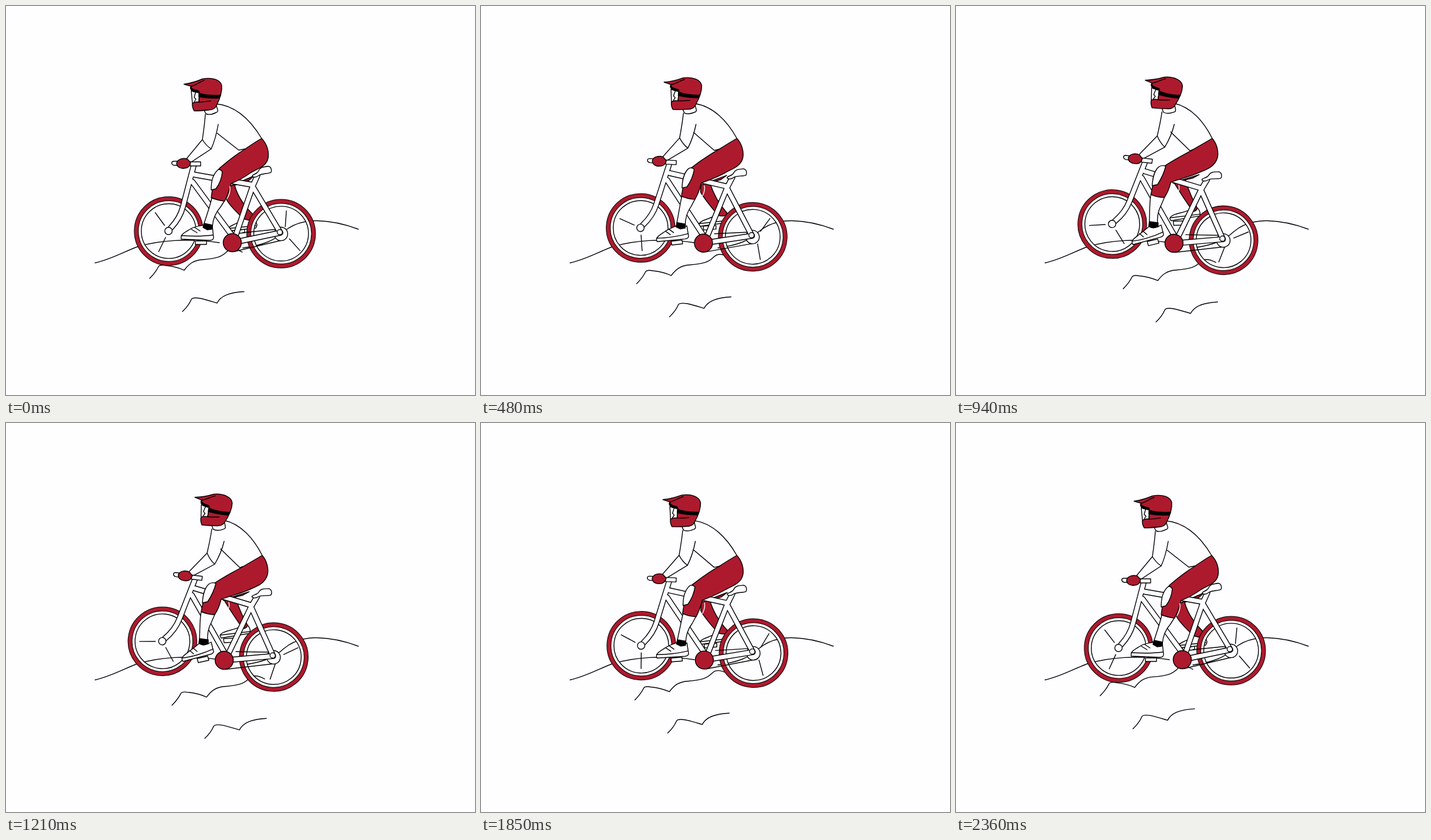
Recreate the animation shown at these times as an HTML page. Size 800 by 664 pixels, loop 2.39 s.

```html
<!DOCTYPE html>
<html lang="en">
<head>
<meta charset="utf-8">
<title>Cyclist</title>
<style>
  html, body { margin: 0; height: 100%; overflow: hidden; background: #fefdff; }
  svg { display: block; width: 800px; height: 664px; }
  .line { fill: none; }
  .white { fill: #fefdff; }
  .red { fill: #ad1a2d; }
  .black { fill: #000; }
</style>
</head>
<body>
<svg viewBox="0 0 800 664" stroke="#000" stroke-width="1.4" stroke-linecap="round" stroke-linejoin="round">
  <defs>
    <g id="wheel" class="line">
      <circle r="50" stroke="#fefdff" stroke-width="6"/>
      <circle r="55.2" stroke-width="8"/>
      <circle r="55.2" stroke="#ad1a2d" stroke-width="6"/>
      <circle r="46.7"/>
    </g>
    <path id="spoke" d="M12 0H39"/>
    <path id="tubes" class="line" d="M281 379Q297 362 302 342L320 273M322 288L419 305M318 300L385 391
      M429 289L421 307L391 394M422 310L468 387L396 402"/>
  </defs>

  <path class="line" d="M152 438.5C179 432.5 200 420 224 411C260 400 310 396 364 404
    M404 413C440 408 458 400 474 385C492 370 512 366.5 530 366.5C555 367 580 373 601 381"/>
  <path id="ground" class="line" d="M245 465C252 458 257 451 260 445C262 441 268 442 273 443C285 444 295 447 304 451
    C312 440 320 434 335 433C360 431 368 428 377 419C383 413 392 414 403 420
    M301 521.5C308 515 313 508 316 501C318 497 325 498 331 499C341 501 350 504 360 507C366 495 380 489 406 487.5"/>

  <!-- far leg -->
  <path class="white" d="M386 383L407 381L407 387L387 389Z"
    data-to="M371 368L394 367L394 374L372 375Z"/>
  <path class="white" d="M377 382C380 374 396 372 406 363L424 366C428 370 429 375 426 379L380 384Z"
    data-to="M365 363C368 355 384 355 400 348L413 346C416 350 418 354 416 359L367 367Z"/>
  <path class="line" d="M377 380L426 375" data-to="M366 362L416 356"/>
  <path class="red" d="M379 309L423 290L413 299L390 306C396 328 410 346 427 361C425 367 416 367 405 363C394 352 382 342 376 330Z"
    data-to="M370 302L415 288L404 294L391 297C397 315 404 332 412 345C411 350 408 351 404 351C394 337 382 319 373 304Z"/>

  <g class="bike">
    <use href="#wheel" x="277.5" y="384.2"/>
    <use href="#wheel" x="469.3" y="388.6"/>
    <g transform="translate(277.5 384.2)"><g id="front">
      <use href="#spoke" transform="rotate(116)"/><use href="#spoke" transform="rotate(234)"/>
    </g></g>
    <g transform="translate(475.5 388.6)"><g id="rear">
      <use href="#spoke" transform="rotate(48)"/><use href="#spoke" transform="rotate(-86)"/>
    </g></g>
    <path class="line" d="M404 387L463 381M390 419L470 400"/>
    <circle class="white" cx="469" cy="389" r="11.5"/>
    <use href="#tubes" stroke-width="10"/>
    <use href="#tubes" stroke="#fefdff" stroke-width="7.2"/>
    <circle class="line" cx="467" cy="386" r="4.5"/>
    <circle class="white" cx="277.2" cy="384" r="6.3"/>
    <circle class="red" cx="386" cy="404" r="15.5"/>
    <path class="white" d="M420 290C422 286 428 288 431 281C434 274 441 275 447 273.5C452 274 454 280 452 284C447 287 436 285 430 290C426 293 421 293 420 290Z"/>
  </g>

  <!-- near leg -->
  <path class="white" d="M323 401L342 401L342 407L323 407Z" data-to="M326 402L344 398L346 405L328 409Z"/>
  <path class="white" d="M351 328C347 345 342 358 337 374L352 377C353 362 358 352 366 343L373 332Z"
    data-to="M333 322C330 338 331 354 330 371L344 374C343 360 345 350 350 341L356 327Z"/>
  <path class="white" d="M299 398C297 390 304 387 314 381C321 376 329 376 337 374C340 381 347 381 352 376L354 395C354 398 352 400 348 400Z"
    data-to="M302 407C297 401 303 397 311 391C319 385 324 381 330 376C333 380 341 379 350 374L354 390C354 392 352 394 348 395Z"/>
  <path class="line" d="M299 392C315 393 338 393 353 391M316 381L326 387M322 378L331 384"
    data-to="M300 401C315 400 338 393 353 386M313 388L320 394M319 384L326 390"/>
  <path class="black" d="M338 371L352 374L351 381L343 382L336 378Z"
    data-to="M330 368L345 370L345 377L337 379L329 376Z"/>
  <path class="red" d="M436 226C446 236 449 250 447 260C444 274 430 277 417 285C404 294 394 299 384 303C381 314 378 323 373 333Q361 332 350 327C353 305 356 289 364 277C378 265 393 253 408 244C418 237 427 231 436 226Z"
    data-to="M437 226C446 236 448 250 446 259C442 273 430 278 418 283C402 291 382 295 367 301C364 313 361 320 356 327Q344 327 333 322C337 300 340 285 352 276C366 266 384 256 401 247C413 240 425 233 437 226Z"/>
  <path class="white" d="M361 280C364 278 367 280 369 283C368 295 364 304 358 312L350 314C350 300 352 289 361 280Z"
    data-to="M346 275C350 272 354 272 358 274C355 286 350 296 344 305L335 307C336 294 338 282 346 275Z"/>
  <path class="line" stroke="#fefdff" d="M382 308C383 317 380 324 377 329" data-to="M380 306C382 311 380 315 379 318"/>

  <!-- torso and arm -->
  <path class="line" d="M358 167C392 170 418 196 436 226M360 217L397 246L408 244"
    data-to="M371 166C401 172 423 198 437 226M366 215L399 247L404 245"/>
  <path class="line" d="M340 185C339 200 337 214 335 228L306 263M362 202C359 219 355 233 350 244L315 267M335 228Q341 238 350 244"
    data-to="M351 181C349 196 346 209 343 222L313 253M372 202C369 215 363 229 356 241L317 262M343 222Q348 234 356 241"/>

  <g class="bike">
    <path class="white" d="M314 266H332V273H314ZM296 265H286C281 266 282 271 287 272L298 272Z"/>
    <path class="red" d="M291 268C293 261 302 259 309 261L315 267C314 273 310 277 304 277C298 278 291 275 291 268Z"/>
    <path class="white" d="M338 178L341 184Q348 187 358 182Q362 181 361 177L358 168Z"/>
    <path class="white" d="M316 145L330 146L329 165L318 166Z"/>
    <path class="line" d="M324 145L321 156L324 159L321 164"/>
    <path class="red" d="M303.5 133.5Q320 131 335 124.5C352 121 366 126 368 136C369 148 364 160 359 170Q356 177 346 177.5Q332 179 321 179Q317 172 318 166Q324 163 329 164L330 147L318 145Q313 141 316 137Z"/>
    <path class="line" d="M316 137C324 135 331 129 338 127M329 164C336 164 342 163 349 162"/>
    <path class="black" d="M329 149Q348 154 366 152L364 157Q346 158 329 155ZM315 138C318 144 324 143 329 145L328 148L319 146Q314 143 315 138Z"/>
  </g>
</svg>
<script>
  const LOOP = 2390, PEAK = 1030;
  const NUMBER = /-?\d+(\.\d+)?/g;
  const rotate = (el, ...args) => el.setAttribute('transform', `rotate(${args.join(' ')})`);
  const byId = id => document.getElementById(id);
  const bikes = document.querySelectorAll('.bike');
  const poses = [...document.querySelectorAll('[data-to]')].map(el => ({
    el, from: el.getAttribute('d'), to: el.dataset.to.match(NUMBER)
  }));

  function draw() {
    const t = performance.now() % LOOP;
    const p = t < PEAK ? t / PEAK : (LOOP - t) / (LOOP - PEAK);
    const eased = p * p * (3 - 2 * p);

    byId('ground').setAttribute('transform', `translate(${44 * p} ${19.4 * p})`);
    bikes.forEach(bike => rotate(bike, 7.1 * eased, 370, 288));
    rotate(byId('front'), -70.5 * p);
    rotate(byId('rear'), 62 * p);

    const k = eased / 0.95;
    for (const { el, from, to } of poses) {
      let i = 0;
      el.setAttribute('d', from.replace(NUMBER, n => (+n + (to[i++] - n) * k).toFixed(2)));
    }
    requestAnimationFrame(draw);
  }
  draw();
</script>
</body>
</html>
```
